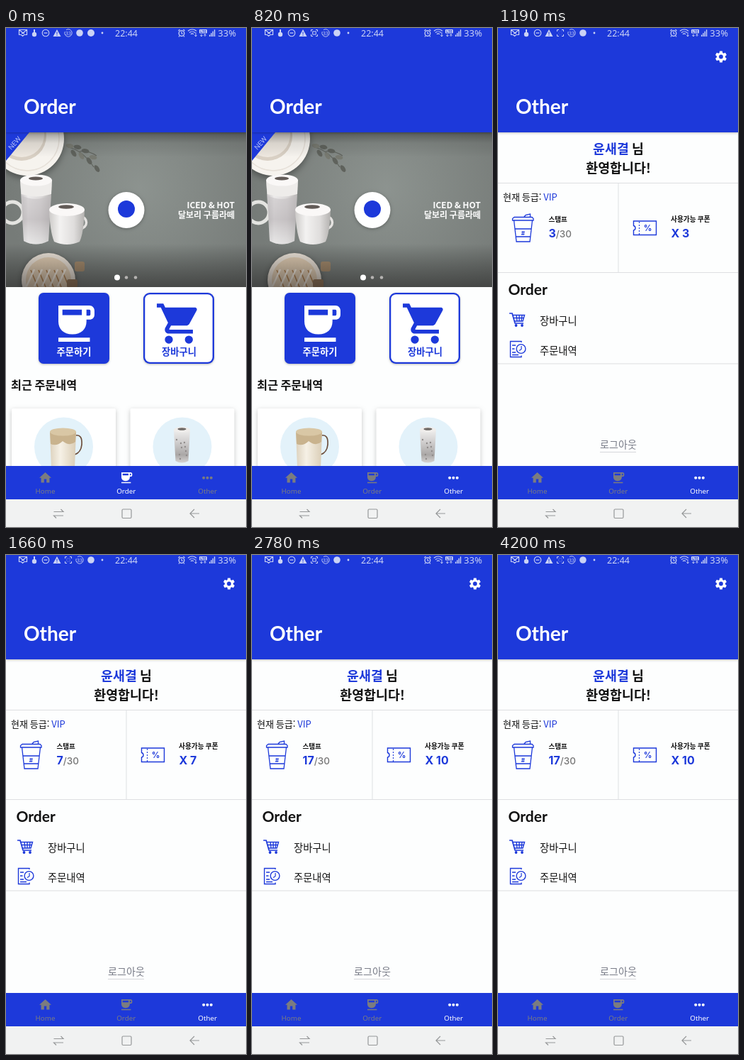
An HTML page with a canvas for the animation above (4.32 s loop, 339 px wide and 703 px high).

```html
<!DOCTYPE html>
<html lang="ko">
<head>
<meta charset="utf-8">
<title>Order</title>
<style>
html, body { margin: 0; width: 100%; height: 100%; overflow: hidden; background: #fff; }
canvas { display: block; width: 339px; height: 703px; }
</style>
</head>
<body>
<canvas id="stage"></canvas>
<script>
const W = 339, H = 703, LOOP = 4320;
const BLUE = '#1d39da', WHITE = '#fff', STATUS = '#cbd3f5', MUTED = '#7b7c80';
const KR = '"Noto Sans CJK KR", "Noto Sans CJK JP", sans-serif';
const LATO = 'Lato, sans-serif', INTER = 'Inter, sans-serif', NOTO = '"Noto Sans", sans-serif';

const canvas = document.getElementById('stage');
const ratio = window.devicePixelRatio || 1;
canvas.width = W * ratio;
canvas.height = H * ratio;
const ctx = canvas.getContext('2d');

const ICONS = {
  cup: new Path2D('M4 3H19.500C21 3 22 4.200 22 5.500V7.500C22 9 21 10 19.500 10H18V11C18 14.500 15.500 17.300 11 17.300C6.500 17.300 4 14.500 4 11zM6 5V7.800H15.700V5zM18 5V8H19.400Q20 8 20 7.400V5.600Q20 5 19.400 5zM4 19H19.700V21H4z'),
  cart: new Path2D('M7 18a2 2 0 1 0 0 4a2 2 0 1 0 0-4zM1 2v2h2l3.6 7.59-1.35 2.45c-.16.28-.25.61-.25.96 0 1.1.9 2 2 2h12v-2H7.42c-.14 0-.25-.11-.25-.25l.03-.12.9-1.63h7.45c.75 0 1.41-.41 1.75-1.03l3.58-6.49c.4-.7-.1-1.48-.88-1.48H5.21l-.94-2zM17 18a2 2 0 1 0 0 4a2 2 0 1 0 0-4z'),
  home: new Path2D('M10 20v-6h4v6h5v-8h3L12 3 2 12h3v8z')
};

const clamp = (v, a = 0, b = 1) => Math.min(b, Math.max(a, v));

function text(str, x, y, font, color, align = 'left') {
  ctx.font = font;
  ctx.fillStyle = color;
  ctx.textAlign = align;
  ctx.fillText(str, x, y);
  return ctx.measureText(str).width;
}
function rect(x, y, w, h, color) {
  ctx.fillStyle = color;
  ctx.fillRect(x, y, w, h);
}
function roundRect(x, y, w, h, r, color) {
  ctx.beginPath();
  ctx.roundRect(x, y, w, h, r);
  ctx.fillStyle = color;
  ctx.fill();
}
function ellipse(x, y, rx, ry, color, angle = 0) {
  ctx.beginPath();
  ctx.ellipse(x, y, rx, ry, angle, 0, Math.PI * 2);
  ctx.fillStyle = color;
  ctx.fill();
}
function circle(x, y, r, color) {
  ellipse(x, y, r, r, color);
}
function ring(x, y, r, color, width) {
  ctx.beginPath();
  ctx.arc(x, y, r, 0, Math.PI * 2);
  ctx.strokeStyle = color;
  ctx.lineWidth = width;
  ctx.stroke();
}
function stroke(d, color, width = 1) {
  ctx.strokeStyle = color;
  ctx.lineWidth = width;
  ctx.stroke(new Path2D(d));
}
function fill(d, color) {
  ctx.fillStyle = color;
  ctx.fill(new Path2D(d));
}
function icon(path, x, y, scale, color) {
  ctx.save();
  ctx.translate(x, y);
  ctx.scale(scale, scale);
  ctx.fillStyle = color;
  ctx.fill(path, 'evenodd');
  ctx.restore();
}
function addStops(g, stops) {
  stops.forEach(([at, color]) => g.addColorStop(at, color));
  return g;
}
function gradient(x0, y0, x1, y1, ...stops) {
  return addStops(ctx.createLinearGradient(x0, y0, x1, y1), stops);
}
function glow(x, y, r, ...stops) {
  return addStops(ctx.createRadialGradient(x, y, 0, x, y, r), stops);
}
function withShadow(blur, dy, color, draw) {
  ctx.save();
  ctx.shadowBlur = blur * ratio;
  ctx.shadowOffsetY = dy * ratio;
  ctx.shadowColor = color;
  draw();
  ctx.restore();
}

function drawStatus(t) {
  const recording = t >= 130;
  stroke('M18.5 2.5h11v7h-4l-2 2-2-2h-3z', STATUS, 1.2);
  stroke('M19 3l5 4 5-4M22 7.500h4', STATUS, 1.2);
  circle(40, 9, 3.2, STATUS);
  rect(39, 2, 2, 6, STATUS);
  ring(56, 7, 4.8, STATUS, 1.1);
  stroke('M53.5 7h5', STATUS, 1.2);
  fill('M72 2l5.5 10h-11z', STATUS);
  stroke('M72 5.5v3M72 9.5v1.2', BLUE, 1.1);

  if (recording) {
    stroke('M83.5 5V2.5H86M90 2.5h2.5V5M92.5 9v2.5H90M86 11.5h-2.5V9', STATUS);
    const phase = (t - 610 + 1010) % 1010;
    ctx.globalAlpha = clamp(phase / 150) * (1 - clamp((phase - 440) / 160));
    ctx.strokeStyle = STATUS;
    ctx.strokeRect(85.7, 5, 4.6, 4);
    ctx.globalAlpha = 1;
  }
  const x = recording ? 104 : 88;
  ctx.beginPath();
  ctx.arc(x, 7, 5.2, -2.2, 3.5);
  ctx.strokeStyle = STATUS;
  ctx.lineWidth = 0.9;
  ctx.stroke();
  text('33', x, 9.6, '7px ' + NOTO, STATUS, 'center');
  circle(x + 16, 7, 4.8, STATUS);
  if (!recording) circle(120, 7, 5, STATUS);
  circle(136, 7, 1.4, STATUS);
  text('22:44', 170, 11.7, '12.5px ' + NOTO, STATUS, 'center');

  ring(248, 7.5, 3.8, STATUS, 1.3);
  stroke('M248 5v3h2M243.5 4l2-2M252.500 4l-2-2M245 11l-1 1.500M251 11l1 1.500', STATUS, 1.1);
  for (const r of [3, 6, 9]) {
    ctx.beginPath();
    ctx.arc(263, 11, r, -2.3, -0.84);
    ctx.lineWidth = 1.2;
    ctx.stroke();
  }
  stroke('M268 6v6M266.500 10l1.500 2 1.500-2', STATUS, 0.9);
  roundRect(273, 2, 11, 5.5, 1, STATUS);
  text('LTE', 278.5, 6.5, '700 5px ' + NOTO, BLUE, 'center');
  stroke('M276 8.500v3M274.500 10l1.500 2 1.500-2M281 12V9M279.500 10.500l1.500-2 1.500 2', STATUS, 0.9);
  for (let i = 0; i < 4; i++) rect(287 + i * 2.3, 9.5 - i * 2.4, 1.4, 2.5 + i * 2.4, STATUS);
  text('33%', 325, 11.7, '13px ' + NOTO, STATUS, 'right');
}

function drawHeader(title, t) {
  withShadow(3, 1, 'rgba(0,0,0,.25)', () => rect(0, 0, W, 147, BLUE));
  text(title, 25, 120.5, '700 28px ' + LATO, WHITE);
  drawStatus(t);
}

function drawTallGlass() {
  ring(9, 260, 15, '#e4e4e1', 5);
  fill('M20 214L65 214L60 300Q42 309 25 300Z',
    gradient(20, 0, 65, 0, [0, '#c6c4c4'], [.25, '#eceaea'], [.65, '#dcd9d9'], [1, '#b6b4b3']));
  fill('M22 236Q42 246 64 235L60 300Q42 309 25 300Z',
    gradient(0, 235, 0, 304, [0, 'rgba(196,192,194,.5)'], [.5, 'rgba(176,171,174,.55)'], [1, 'rgba(228,228,228,.5)']));
  fill('M20 214H65L64 234Q42 241 21.500 234Z', '#eeecea');
  ellipse(42.5, 214.5, 22.5, 8, '#faf8f7');
  ellipse(42, 212, 10, 2.5, '#625b57');
}
function drawMug() {
  ring(105, 274, 8.5, '#e4e2e0', 3.5);
  fill('M61 256L111 256Q110 288 104 301Q86 309 68 301Q62 286 61 256Z',
    gradient(61, 0, 111, 0, [0, '#cdcbc9'], [.3, '#f3f2f1'], [.7, '#dfdddc'], [1, '#b4b2b0']));
  ellipse(86, 256, 25, 9, '#faf8f7');
  ellipse(85, 252, 11, 2.8, '#625b57');
}
function drawBranch() {
  stroke('M88 168Q108 172 124 196M104 174Q116 172 128 180', '#5f625c', 1.2);
  for (let i = 0; i < 8; i++) {
    const x = 90 + i * 5.5, side = i % 2 ? 6 : -4;
    ellipse(x, 170 + i * i * .45 + side, 5.5, 3, i % 3 ? '#5f625c' : '#777970', .5 + side * .08);
  }
}
function drawBanner() {
  ctx.save();
  ctx.beginPath();
  ctx.rect(0, 147, W, 218);
  ctx.clip();
  rect(0, 147, W, 218, '#767b78');
  rect(0, 147, W, 218, glow(190, 225, 190, [0, 'rgba(148,155,151,.75)'], [1, 'rgba(148,155,151,0)']));
  drawBranch();

  withShadow(10, 4, 'rgba(0,0,0,.35)', () => circle(30, 156, 52, '#f6f3ee'));
  ring(30, 156, 45, '#e6e0d8', 1.5);
  circle(22, 152, 35, '#d9d0c4');
  circle(22, 150, 32, '#eee8e0');
  withShadow(8, 3, 'rgba(0,0,0,.4)', () => circle(60, 355, 38, '#eee5da'));
  circle(60, 355, 32, '#e3cfb5');
  for (let i = 0; i < 5; i++) {
    stroke(`M${35 + i * 11} 341l10 24`, '#b18353', 1.6);
    stroke(`M${40 + i * 11} 340l-11 24`, '#f8efe3', 2.4);
  }
  roundRect(97, 329, 14, 14, 3, '#a98f70');
  roundRect(86, 354, 15, 12, 3, '#97795b');
  drawTallGlass();
  drawMug();

  rect(0, 147, W, 218, gradient(0, 147, 0, 365,
    [0, 'rgba(20,22,22,.4)'], [.07, 'rgba(30,32,32,.1)'], [.16, 'rgba(0,0,0,0)'],
    [.72, 'rgba(0,0,0,0)'], [1, 'rgba(20,18,18,.5)']));

  fill('M0 147H33L0 187Z', BLUE);
  ctx.save();
  ctx.translate(12, 162);
  ctx.rotate(-0.84);
  text('NEW', 0, 3.5, '9.5px ' + NOTO, '#bdc8f8', 'center');
  ctx.restore();

  withShadow(5, 1, 'rgba(0,0,0,.3)', () => circle(170, 256.5, 25.5, WHITE));
  circle(170, 255, 12, BLUE);
  text('ICED & HOT', 323, 253.5, '700 12px ' + KR, WHITE, 'right');
  text('달보리 구름라떼', 323, 267.5, '700 12px ' + KR, WHITE, 'right');
  circle(157, 351.5, 4, WHITE);
  circle(170, 351.5, 2.3, '#b5b3b1');
  circle(183, 351.5, 2.3, '#b5b3b1');
  ctx.restore();
}

function drawOrder(t) {
  drawBanner();
  drawHeader('Order', t);

  const shade = 'rgba(0,0,0,.28)';
  withShadow(3, 1, shade, () => roundRect(46, 373, 100, 100, 7, BLUE));
  icon(ICONS.cup, 62.7, 382.5, 2.83, WHITE);
  text('주문하기', 96, 461, '700 13.3px ' + KR, WHITE, 'center');
  withShadow(3, 1, shade, () => roundRect(194, 373, 100, 100, 9, BLUE));
  roundRect(196.3, 375.3, 95.4, 95.4, 7, WHITE);
  icon(ICONS.cart, 210.2, 382.5, 2.83, BLUE);
  text('장바구니', 244.5, 461, '700 13.3px ' + KR, BLUE, 'center');

  text('최근 주문내역', 7, 509, '700 16.2px ' + KR, '#111');
  for (const x of [8, 175.5]) {
    withShadow(6, 2, 'rgba(0,0,0,.22)', () => roundRect(x, 536, 147, 120, 2, WHITE));
    circle(x + 73.5, 590, 41.5, '#e3f2fa');
  }
  stroke('M98 574Q108 572 107 587Q106 598 97 601', '#6b4c38', 1.7);
  fill('M62 570L99 570L97 620L64 620Z', gradient(62, 0, 99, 0, [0, '#ddd2be'], [.4, '#f6f1e6'], [1, '#dacdb6']));
  fill('M62 569L99 569L98 583Q90 590 80 582Q72 590 63 586Z', '#c9b38e');
  ellipse(80.5, 569, 18.5, 5.5, '#d9c7a5');
  fill('M237 566L260 566L257.500 610Q248 615 239.500 610Z',
    gradient(0, 566, 0, 613, [0, '#f0efee'], [.35, '#d2d0d0'], [.75, '#aaa7a6'], [1, '#d8d6d5']));
  for (let i = 0; i < 9; i++) circle(241 + i * 7 % 15, 580 + i * 11 % 28, 1.2, '#908c8b');
  ellipse(248.5, 566, 11.5, 4, '#efedeb');
  ellipse(248.5, 565, 6, 1.7, '#6f6965');
}

function drawGear(x, y) {
  ctx.beginPath();
  for (let i = 0; i < 6; i++) {
    const a = (i + 1) * Math.PI / 3;
    for (const [da, r] of [[-.38, 6], [-.23, 8.3], [.23, 8.3], [.38, 6]])
      ctx.lineTo(x + r * Math.sin(a + da), y - r * Math.cos(a + da));
  }
  ctx.closePath();
  ctx.fillStyle = WHITE;
  ctx.fill();
  circle(x, y, 2.9, BLUE);
}

function drawListIcons() {
  // Takeaway cup
  stroke('M22.500 271L26 301H45L48.500 271M20.500 271V268.500L23 266.500H48L50 268.500V271ZM37 266L39 263.500L45.500 262V266M24 283H47M25 294H46', BLUE, 1.3);
  text('#', 35.3, 291.5, '700 8px ' + INTER, BLUE, 'center');
  // Coupon
  stroke('M191.500 272H223.500V291.500H191.500V285Q194 284.500 194 282Q194 279 191.500 278.500Z', BLUE, 1.4);
  ctx.setLineDash([2, 2]);
  stroke('M199.500 273V291', BLUE, 1.1);
  ctx.setLineDash([]);
  text('%', 211.5, 286, '700 11.5px ' + INTER, BLUE, 'center');
  // Basket
  stroke('M16 402H20L24 416H36', BLUE, 1.7);
  stroke('M21 404.500H37.500L35 413H23.500M22 408.500H36.500M26 404.500L27 413M30 404.500V413M34 404.500L33 413', BLUE, 1.4);
  circle(25.5, 419, 1.9, BLUE);
  circle(34, 419, 1.9, BLUE);
  // History
  stroke('M33 443V441.500H17.500V463.500H33V461.500M20 447H25M20 452H23.500M20 457H25M20 460.500H29', BLUE, 1.4);
  ring(32.5, 452, 6.4, BLUE, 1.4);
  stroke('M33 448V452.500L30 454.500', BLUE, 1.2);
}

function drawOther(t) {
  drawHeader('Other', t);
  drawGear(315, 40.5);

  const big = '700 18.4px ' + KR;
  ctx.font = big;
  const name = '윤새결', suffix = ' 님';
  const left = 170 - ctx.measureText(name + suffix).width / 2;
  text(suffix, left + text(name, left, 177, big, BLUE), 177, big, '#111');
  text('환영합니다!', 170, 204, big, '#111', 'center');

  for (const y of [218, 344, 472.5]) rect(0, y, W, 1, '#dedfe2');
  rect(169.5, 218, 1, 126, '#dedfe2');

  const label = '13px ' + KR;
  text('VIP', 7 + text('현재 등급: ', 7, 242.5, label, '#111'), 242.5, label, BLUE);

  const count = clamp(Math.floor((t - 870) / 100), 0, 17);
  text('스탬프', 71.5, 272.5, '700 9.5px ' + KR, '#111');
  const digits = text(String(count), 71.5, 294.7, '700 16px ' + INTER, BLUE);
  text('/30', 71.5 + digits, 294.7, '500 13.5px ' + INTER, '#777');
  text('사용가능 쿠폰', 244, 272.5, '700 9.7px ' + KR, '#111');
  text('X ' + Math.min(count, 10), 244.5, 294.7, '700 16px ' + INTER, BLUE);

  text('Order', 14.5, 376, '700 21px ' + LATO, '#111');
  text('장바구니', 59, 417.5, '14.3px ' + KR, '#111');
  text('주문내역', 59, 459.5, '14.3px ' + KR, '#111');
  drawListIcons();
  text('로그아웃', 170, 592.3, '14.1px ' + KR, '#777a86', 'center');
  rect(144, 597, 51, 1, '#d5d6db');
}

function drawNav(t) {
  const mix = clamp((t - 420) / 180);
  const tint = k => {
    const [r, g, b] = [123, 124, 128].map(v => Math.round(v + (255 - v) * k));
    return `rgb(${r},${g},${b})`;
  };
  const order = tint(1 - mix), other = tint(mix), font = '9.8px ' + NOTO;
  rect(0, 617, W, 47, BLUE);
  icon(ICONS.home, 45.3, 623.5, .85, MUTED);
  text('Home', 55.5, 655.5, font, MUTED, 'center');
  icon(ICONS.cup, 159.6, 623.5, .85, order);
  text('Order', 169.7, 655.5, font, order, 'center');
  for (let i = -1; i <= 1; i++) circle(284.5 + i * 5.3, 633.7, 2, other);
  text('Other', 284.7, 655.5, font, other, 'center');

  rect(0, 664, W, 39, '#f1f2f2');
  const line = '#969899';
  stroke('M67.500 681.500H81L77.500 678M81 687H67.500L71 690.500', line, 1.2);
  ctx.beginPath();
  ctx.roundRect(164, 678, 13, 12.5, 1.5);
  ctx.stroke();
  stroke('M273 684H260M266 678L260 684L266 690', line, 1.2);
}

function render(t) {
  ctx.setTransform(ratio, 0, 0, ratio, 0, 0);
  rect(0, 0, W, H, '#fdfefe');
  (t < 890 ? drawOrder : drawOther)(t);
  drawNav(t);
}

const start = performance.now();
function tick() {
  render((performance.now() - start) % LOOP);
  requestAnimationFrame(tick);
}
tick();
</script>
</body>
</html>
```
